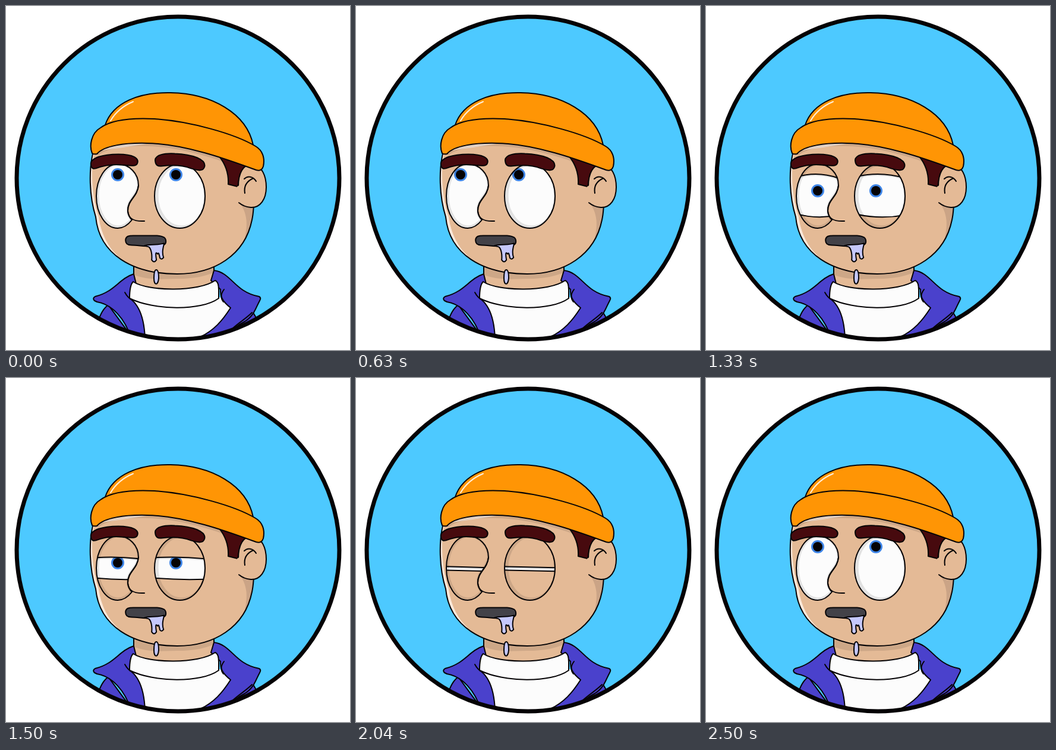
An HTML page for the animation above (2.54 s loop, 579x579 px).

```html
<!DOCTYPE html>
<html lang="en">
<head>
<meta charset="utf-8">
<title>Sleepy eyes</title>
<style>
  html, body { margin: 0; width: 100%; height: 100%; overflow: hidden; background: #fff; }
  svg { display: block; width: 100%; height: 100%; }
  .ink { stroke: #050305; stroke-width: 2; stroke-linecap: round; stroke-linejoin: round; }
  .line { fill: none; }
  .skin { fill: #e4ba96; }
  .hat { fill: #ff9505; }
  .hair { fill: #470a0e; }
  .coat { fill: #4a41cc; }
  .white { fill: #fcfcfc; }
  .shade { fill: none; stroke: #000; stroke-opacity: .1; }
</style>
</head>
<body>
<svg viewBox="0 0 579 579">
  <defs>
    <path id="headShape" d="M147 245C139 275 140 320 151 355C157 418 213 451 288 451C350 451 402 420 414 360C418 342 418 320 417 290L400 240L250 200Z"/>
    <path id="eyeL" d="M188 266C208 266 223 282 223 302C221 322 205 326 205 345Q206 355 212 360C205 369 198 374 188 374C168 374 152 350 152 320C152 290 168 266 188 266Z"/>
    <ellipse id="eyeR" cx="292.5" cy="320" rx="42.5" ry="54"/>
    <path id="neck" d="M215 436V490H350V436Z"/>
    <clipPath id="clipDisc"><circle cx="289.5" cy="289.5" r="271"/></clipPath>
    <clipPath id="clipHead"><use href="#headShape"/></clipPath>
    <clipPath id="clipNeck"><use href="#neck"/></clipPath>
    <clipPath id="clipL"><use href="#eyeL"/></clipPath>
    <clipPath id="clipR"><use href="#eyeR"/></clipPath>
  </defs>

  <circle cx="289.5" cy="289.5" r="271.5" fill="#4dc9ff"/>
  <g clip-path="url(#clipDisc)">
    <use href="#neck" class="skin ink"/>
    <g clip-path="url(#clipNeck)">
      <path class="shade" stroke-width="12" d="M205 440C230 457 260 454 288 453C315 453 335 450 360 438"/>
    </g>

    <path class="white" d="M205 490H360L379 508L335 570H225Z"/>
    <path class="coat ink" d="M172 503C162 511 159 520 154 532L190 575H225Z"/>
    <path class="coat ink" d="M405 500L416 516Q420 523 424 530L400 575H330Z"/>
    <path class="coat ink" d="M215 451C190 459 183 481 150 489Q145 492 149 496L153 498C178 502 200 525 211 560H234C233 532 227 508 212 495L222 480Z"/>
    <path class="ink line" d="M200 482Q205 491 212 495"/>
    <path class="coat ink" d="M350 445C380 449 384 481 426 489Q430 491 427 496C420 509 417 522 402 531Q384 540 368 558L327 557C350 546 364 530 378 508C364 497 360 488 361 477L345 462Z"/>
    <path class="ink line" d="M414 516C400 530 382 538 370 556M367 477C361 485 361 492 366 498"/>
    <path class="white ink" d="M214 464C240 481 325 481 352 462Q358 464 358 478V492C328 514 248 512 208 492Q208 470 214 464Z"/>
  </g>

  <use href="#headShape" class="skin"/>
  <g clip-path="url(#clipHead)">
    <use href="#headShape" fill="#fbe8da"/>
    <path class="skin" d="M149 245C142 275 144 320 156 355C164 414 205 440 240 446L300 460H430V230H250Z"/>
    <path fill="#cba486" d="M392 330Q405 341 418 338V365C414 385 405 398 396 408C408 378 409 350 392 330Z"/>
    <path class="shade" stroke-width="8" d="M153 249C165 236 200 231 238 232C305 233 385 264 422 278"/>
  </g>
  <use href="#headShape" class="ink line"/>

  <path class="hair ink" d="M358 252L404 266Q392 286 390 304L374 300C375 283 371 268 358 252Z"/>
  <path class="skin ink" d="M391 304C391 280 400 267 412 267C432 267 438 288 438 305C438 325 428 340 412 339Q400 338 392 331"/>
  <path class="skin" d="M389 304L396 300V331L391 330Z"/>
  <path class="ink line" d="M402 315C400 303 405 295 416 290M401 291C407 285 416 287 421 295"/>

  <path class="hat ink" d="M167 200C180 162 224 145 277 146C345 147 405 180 416 234Z"/>
  <path fill="none" stroke="#fff0dc" stroke-width="2" stroke-linecap="round" d="M176 193C185 178 197 168 214 161"/>
  <path class="hat ink" d="M145 248C140 236 143 214 159 205C178 191 210 188 250 190C310 194 385 215 420 236C432 243 436 256 433 270Q430 279 421 276C385 263 305 232 238 231C200 230 165 235 153 249Q148 250 145 248Z"/>

  <g id="eyes"></g>
  <path class="ink line" d="M223 302C221 322 204 326 205 345C206 358 215 363 233 362"/>

  <g transform="translate(-.8 .4)">
    <path class="hair ink" d="M144 268C140 255 165 249 190 249C215 249 225 256 222 264C220 271 208 268 195 267C175 265 160 270 152 273Q145 275 144 268Z"/>
    <path class="hair ink" d="M252 261C250 250 268 247 285 248C315 249 338 258 335 270C333 279 322 276 312 273C297 267 280 267 262 269Q253 270 252 261Z"/>
    <path class="ink" fill="#434248" d="M202 394C202 387 208 386 215 386H255C267 387 270 390 270 396C270 403 262 404 250 404C236 405 223 402 212 402Q202 402 202 394Z"/>
    <path class="ink" fill="#c5c8fb" d="M234 403C243 400 253 403 267 399C265 407 263 415 266 423Q263 427 260 424C258 416 258 414 256 417C253 413 252 415 254 427Q250 433 246 427C247 417 245 408 241 405Z"/>
  </g>
  <path class="ink" fill="#c5c8fb" d="M253 444C256 444 257 450 257 458C256 471 249 471 249 458C249 450 250 444 253 444Z"/>

  <circle cx="289.5" cy="289.5" r="271.5" fill="none" stroke="#050305" stroke-width="7"/>
</svg>
<script>
const LOOP = 2540;
const MIDDLE = 321.5;
const FULLY_OPEN = 60;
const eyes = [
  { id: "L", left: 150, right: 225, pupil: 188, shadeShift: 1 },
  { id: "R", left: 248, right: 337, pupil: 286, shadeShift: 3 }
];

// Keyframes: [time, value]; equal neighbouring values are holds.
const gazeX = [[0, 0], [40, 0], [500, -12], [630, -12], [880, -9.2], [1080, -9], [1330, 0], [LOOP, 0]];
const gazeY = [[0, 284], [630, 284], [880, 290.5], [1080, 291], [1330, 311], [1800, 311], [2010, 284], [LOOP, 284]];
const opening = [[0, FULLY_OPEN], [1080, FULLY_OPEN], [1580, 17], [1630, 17], [2130, 2], [2170, 2], [2500, FULLY_OPEN], [LOOP, FULLY_OPEN]];

function valueAt(keys, time) {
  const next = Math.max(1, keys.findIndex(([t]) => t > time));
  const [t0, v0] = keys[next - 1], [t1, v1] = keys[next];
  const u = (time - t0) / (t1 - t0);
  return v0 + (v1 - v0) * u * u * (3 - 2 * u);
}

document.getElementById("eyes").innerHTML = eyes.map(({ id, pupil, shadeShift }) => `
  <g clip-path="url(#clip${id})">
    <use href="#eye${id}" class="white"/>
    <g class="pupil">
      <circle cx="${pupil}" r="11" fill="#3f86e8"/>
      <circle cx="${pupil}" r="8" fill="#050305"/>
    </g>
    <g class="lids">
      <path class="lidShade shade" stroke-width="6"/>
      <path class="lid skin ink"/>
      <path class="lid skin ink"/>
    </g>
    <use href="#eye${id}" class="shade" stroke-width="7" transform="translate(${shadeShift} -1)"/>
  </g>
  <use href="#eye${id}" class="ink line"/>`).join("");

const pupils = document.querySelectorAll(".pupil");
const lidGroups = document.querySelectorAll(".lids");
const lids = document.querySelectorAll(".lid");
const lidShades = document.querySelectorAll(".lidShade");

// One lid edge: side -1 is the upper lid, +1 the lower one, which travels less.
function lidEdge({ left, right }, open, side) {
  const offset = side < 0 ? open : open * 0.88;
  const bulge = 0.0044 * offset * offset;
  const endY = MIDDLE + side * (offset - bulge);
  const controlY = endY + side * 2 * bulge;
  return `M${left} ${endY - 1}Q${(left + right) / 2} ${controlY} ${right} ${endY + 1}`;
}

function draw(now) {
  const time = now % LOOP;
  const open = valueAt(opening, time);
  const shift = `translate(${valueAt(gazeX, time)} ${valueAt(gazeY, time)})`;
  eyes.forEach((eye, i) => {
    pupils[i].setAttribute("transform", shift);
    lidGroups[i].style.display = open > FULLY_OPEN - 1 ? "none" : "";
    lidShades[i].setAttribute("d", lidEdge(eye, open, -1));
    [-1, 1].forEach((side, j) => {
      const far = MIDDLE + side * 90;
      lids[2 * i + j].setAttribute("d", `${lidEdge(eye, open, side)}V${far}H${eye.left}Z`);
    });
  });
  requestAnimationFrame(draw);
}
draw(0);
</script>
</body>
</html>
```
